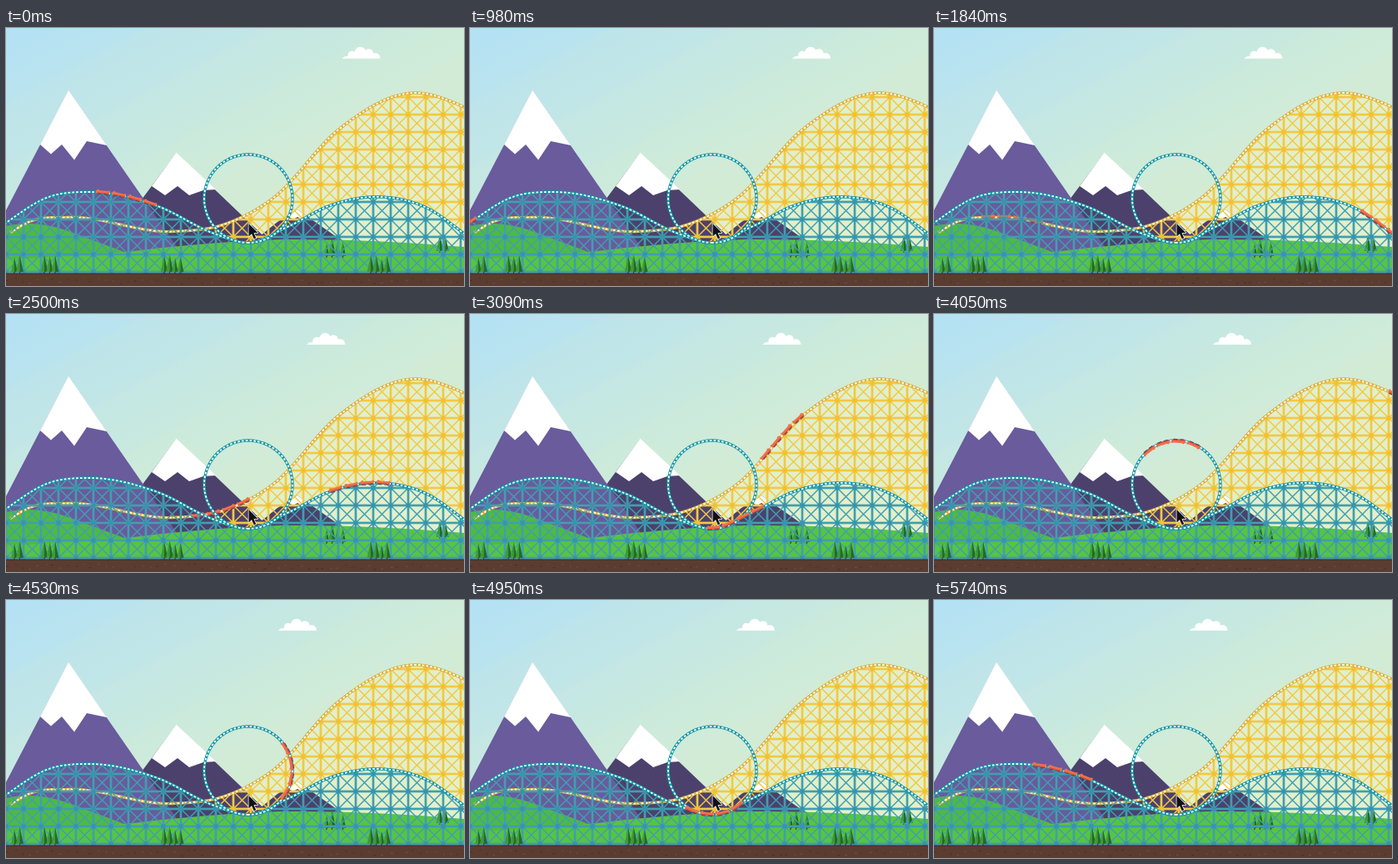
Recreate the animation shown at these times as an HTML page with a canvas. Size 550 by 310 pixels, loop 5.77 s.

```html
<!DOCTYPE html>
<html lang="en">
<head>
<meta charset="utf-8">
<title>Roller coasters</title>
<style>
html, body { margin: 0; width: 100%; height: 100%; overflow: hidden; background: #c8e8e0; }
canvas { display: block; width: 550px; height: 310px; }
</style>
</head>
<body>
<canvas id="stage"></canvas>
<script>
const W = 550, H = 310, LOOP = 5770, CELL = 21, FLOOR = 295;
const ring = { x: 291, y: 205, r: 53 };
const scale = window.devicePixelRatio || 1;

function layer(el, paint) {
  el.width = W * scale;
  el.height = H * scale;
  const c = el.getContext('2d');
  c.scale(scale, scale);
  if (paint) paint(c);
  return c;
}

let seed = 7;
const rnd = () => (seed = seed * 16807 % 2147483647) / 2147483647;

// Smooth height curve through a few key points
function curve(pts) {
  const last = pts.length - 1;
  const rise = i => (pts[i + 1][1] - pts[i][1]) / (pts[i + 1][0] - pts[i][0]);
  const slope = pts.map((p, i) => {
    if (i === 0) return rise(0);
    if (i === last) return rise(last - 1);
    const before = p[0] - pts[i - 1][0], after = pts[i + 1][0] - p[0];
    return (rise(i - 1) * after + rise(i) * before) / (before + after);
  });
  return x => {
    let i = 0;
    while (i < last - 1 && x > pts[i + 1][0]) i++;
    const [x0, y0] = pts[i], [x1, y1] = pts[i + 1];
    const h = x1 - x0, t = (x - x0) / h, u = 1 - t;
    return y0 * (1 + 2 * t) * u * u + slope[i] * h * t * u * u
      + y1 * t * t * (3 - 2 * t) - slope[i + 1] * h * t * t * u;
  };
}

const blueY = curve([[-110, 325], [0, 234], [50, 203.5], [100, 197], [182, 214], [250, 247],
  [291, 258], [340, 238], [390, 213], [450, 203], [505, 216], [550, 247], [660, 350]]);
const goldY = curve([[-110, 330], [0, 249], [30, 232], [75, 227.5], [200, 244.5], [260, 236.5],
  [320, 205], [400, 121.5], [490, 78], [550, 95], [660, 180]]);

function span(f, from, to) {
  const out = [], step = from < to ? 1 : -1;
  for (let x = from; x !== to + step; x += step) out.push([x, f(x)]);
  return out;
}

function measure(pts) {
  let s = 0;
  return pts.map((p, i) => {
    if (i) s += Math.hypot(p[0] - pts[i - 1][0], p[1] - pts[i - 1][1]);
    return [p[0], p[1], s];
  });
}

const circle = [];
for (let d = 2; d < 360; d += 2) {
  const a = (90 + d) * Math.PI / 180;
  circle.push([ring.x + ring.r * Math.cos(a), ring.y + ring.r * Math.sin(a)]);
}
const entry = span(blueY, 660, ring.x), leave = span(blueY, ring.x, -110);
const bluePath = measure([...entry, ...circle, ...leave]);
const goldPath = measure(span(goldY, -110, 660));
const bottomS = bluePath[entry.length - 1][2];
const entryS = x => bluePath[660 - x][2];
const leaveS = x => bluePath[entry.length + circle.length + ring.x - x][2];
const goldS = x => goldPath[x + 110][2];

function pointAt(path, s) {
  if (s < 0 || s >= path[path.length - 1][2]) return null;
  let lo = 0, hi = path.length - 1;
  while (hi - lo > 1) {
    const mid = (lo + hi) >> 1;
    if (path[mid][2] > s) hi = mid; else lo = mid;
  }
  const a = path[lo], b = path[hi], k = (s - a[2]) / (b[2] - a[2]);
  return [a[0] + (b[0] - a[0]) * k, a[1] + (b[1] - a[1]) * k];
}

function lerpKeys(keys, t) {
  let i = 0;
  while (i < keys.length - 2 && t > keys[i + 1][0]) i++;
  const [t0, v0] = keys[i], [t1, v1] = keys[i + 1];
  return v0 + (v1 - v0) * (t - t0) / (t1 - t0);
}

function trace(c, pts) {
  c.beginPath();
  pts.forEach(p => c.lineTo(p[0], p[1]));
}
function poly(c, color, pts) {
  trace(c, pts);
  c.closePath();
  c.fillStyle = color;
  c.fill();
}

// Slanted gradient with soft steps, like wide beams of light
function sky(c) {
  c.save();
  c.rotate(Math.atan2(.88, .47));
  const g = c.createLinearGradient(0, 0, 460, 0);
  g.addColorStop(0, '#b3e1f5');
  g.addColorStop(.4, '#c2e6e5');
  g.addColorStop(1, '#d8edcb');
  c.fillStyle = g;
  c.fillRect(-20, -600, 700, 1200);
  c.fillStyle = 'rgba(224,240,190,.07)';
  for (let d = 80; d < 300; d += 68) c.fillRect(d, -600, 700, 1200);
  c.restore();
}

function mountains(c) {
  poly(c, '#4c416c', [[300, 254], [326, 233], [350, 218], [404, 256], [404, 268], [300, 268]]);
  poly(c, '#fff', [[350, 218], [361, 226], [355, 230], [350, 227], [345, 230], [338, 226]]);
  poly(c, '#4c416c', [[204.5, 150], [324, 264], [120, 270], [120, 264]]);
  poly(c, '#fff', [[204.5, 149.5], [252, 194], [237, 195], [220, 201], [206, 190], [191, 201], [175, 190]]);
  poly(c, '#695b9c', [[75, 75], [208, 267], [208, 275], [0, 275], [0, 219]]);
  poly(c, '#fff', [[75, 74.5], [121, 141], [97, 136], [82, 158.5], [67, 140], [54, 151.5], [41, 140]]);
}

function hills(c) {
  c.fillStyle = '#4fb944';
  c.beginPath();
  c.moveTo(0, 238);
  c.quadraticCurveTo(35, 230, 75, 244);
  c.lineTo(150, 272);
  c.lineTo(150, FLOOR);
  c.lineTo(0, FLOOR);
  c.fill();
  c.fillStyle = '#58c441';
  c.beginPath();
  c.moveTo(0, 278);
  c.quadraticCurveTo(80, 275, 145, 269);
  c.quadraticCurveTo(240, 257, 330, 254);
  c.quadraticCurveTo(430, 253, 550, 263);
  c.lineTo(W, FLOOR);
  c.lineTo(0, FLOOR);
  c.fill();
}

function grove(c, x, y, count) {
  for (let i = 0; i < count; i++, x += 6.5) {
    const h = 17 + rnd() * 7, w = h * .2;
    c.fillStyle = '#5b3a2e';
    c.fillRect(x - .7, y - 3, 1.4, 3);
    poly(c, '#3f9a35', [[x, y - h], [x - w, y - 2], [x, y - 2]]);
    poly(c, '#23692c', [[x, y - h], [x + w, y - 2], [x, y - 2]]);
  }
}

// Posts, beams and crosses inside the given outline
function lattice(c, outline, color, node) {
  c.save();
  trace(c, outline);
  c.closePath();
  c.clip();
  c.strokeStyle = color;
  c.fillStyle = node;
  for (let x = 0; x <= W; x += CELL)
    for (let y = 62; y < FLOOR; y += CELL) {
      c.lineWidth = 1.5;
      c.beginPath();
      c.moveTo(x, y); c.lineTo(x + CELL, y + CELL);
      c.moveTo(x + CELL, y); c.lineTo(x, y + CELL);
      c.stroke();
      c.lineWidth = 2.4;
      c.strokeRect(x, y, CELL, CELL);
    }
  for (let x = 0; x <= W; x += CELL)
    for (let y = 62; y < FLOOR; y += CELL) c.fillRect(x - 2.5, y - 2.5, 5, 5);
  c.restore();
}

function rail(c, pts, color) {
  trace(c, pts);
  c.strokeStyle = color;
  c.lineWidth = 3.4;
  c.stroke();
  c.setLineDash([2.6, 2.2]);
  c.strokeStyle = '#fff';
  c.lineWidth = 1.8;
  c.stroke();
  c.setLineDash([]);
}

function ground(c) {
  c.fillStyle = '#5b3c31';
  c.fillRect(0, FLOOR, W, H - FLOOR);
  c.fillStyle = '#4b3028';
  c.fillRect(0, FLOOR - .5, W, 1.5);
  for (let x = 3; x < W; x += 9) {
    const y = 299 + rnd() * 8, a = rnd() * 3;
    c.strokeStyle = rnd() < .5 ? '#74503f' : '#472c24';
    c.beginPath();
    c.moveTo(x, y);
    c.lineTo(x + 3 * Math.cos(a), y + 2 * Math.sin(a));
    c.stroke();
  }
}

function paintBack(c) {
  sky(c);
  const goldTop = span(goldY, 246, W);
  poly(c, 'rgba(240,243,200,.5)', [...goldTop, [W, 270], [246, 270]]);
  mountains(c);
  hills(c);
  grove(c, 385, 276, 4);
  grove(c, 521, 270, 2);
  lattice(c, [...goldTop, ...span(blueY, W, 246)], '#f2c943', '#f0c132');
  rail(c, span(goldY, 5, W + 2), '#dbb03a');
}

function paintFront(c) {
  lattice(c, [...span(blueY, 0, W), [W, FLOOR], [0, FLOOR]], '#3f9fb1', '#3893ad');
  grove(c, 10, FLOOR, 2);
  grove(c, 46, FLOOR, 3);
  grove(c, 190, FLOOR, 4);
  grove(c, 438, FLOOR, 4);
  ground(c);
  rail(c, span(blueY, -2, W + 2), '#1296a6');
  const bottom = [ring.x, ring.y + ring.r];
  rail(c, [bottom, ...circle, bottom], '#1296a6');
}

function car(c, dir) {
  c.scale(1, dir);
  c.fillStyle = '#5d4058';
  c.fillRect(-6.5, .2, 5, 2);
  c.fillRect(1.5, .2, 5, 2);
  poly(c, '#f2704a', [[-8.4, -3.4], [-5.5, -2.4], [4, -2.6], [6, -3.8], [8.4, -1.8], [8, 1], [-8, 1]]);
  c.fillStyle = '#d34d3c';
  c.fillRect(-7.5, 0, 15, 1);
}

// dir: 1 puts the cars left of travel, -1 right of it
function train(c, path, front, dir) {
  for (let i = 0; i < 4; i++) {
    const s = front - 8.5 - i * 19.3;
    const a = pointAt(path, s - 5), b = pointAt(path, s + 5);
    if (!a || !b) continue;
    c.save();
    c.translate((a[0] + b[0]) / 2, (a[1] + b[1]) / 2);
    c.rotate(Math.atan2(b[1] - a[1], b[0] - a[0]));
    car(c, dir);
    c.restore();
  }
}

function cloud(c, x) {
  c.save();
  c.translate(x, 0);
  c.fillStyle = '#fff';
  c.beginPath();
  c.moveTo(0, 36.8);
  c.quadraticCurveTo(2, 33.6, 7, 33.8);
  c.bezierCurveTo(6, 28, 12, 26.5, 15, 28.5);
  c.bezierCurveTo(17, 21, 26, 21.5, 28, 26.5);
  c.bezierCurveTo(32, 23.5, 38, 26, 37, 30.5);
  c.bezierCurveTo(42, 28.5, 46, 32, 45.8, 36.8);
  c.fill();
  c.restore();
}

function pointer(c) {
  trace(c, [[291.5, 235], [291.5, 250.5], [295, 247.2], [297.8, 253.4], [300.2, 252.3],
    [297.5, 246.3], [302.3, 246]]);
  c.closePath();
  c.lineJoin = 'round';
  c.strokeStyle = '#fff';
  c.lineWidth = 1.4;
  c.stroke();
  c.fillStyle = '#111';
  c.fill();
}

const ringLength = 2 * Math.PI * ring.r;
const blueKeys = [[2500, entryS(388)], [3090, bottomS + 7], [4050, bottomS + 197],
  [4950, bottomS + ringLength + 34], [5740, leaveS(118)]];
const goldKeys = [[2500, goldS(293)], [3090, goldS(401)], [4050, goldS(545) + 75]];

const stage = layer(document.getElementById('stage'));
const back = document.createElement('canvas'), front = document.createElement('canvas');
layer(back, paintBack);
layer(front, paintFront);

function draw(now) {
  const t = now % LOOP;
  stage.drawImage(back, 0, 0, W, H);
  cloud(stage, 403.7 - t * .0169);
  train(stage, goldPath, lerpKeys(goldKeys, t), 1);
  stage.drawImage(front, 0, 0, W, H);
  train(stage, bluePath, leaveS(108) + t * .186, -1);
  train(stage, bluePath, lerpKeys(blueKeys, t), -1);
  pointer(stage);
}

const start = performance.now();
function tick() {
  draw(performance.now() - start);
  requestAnimationFrame(tick);
}
tick();
</script>
</body>
</html>
```
